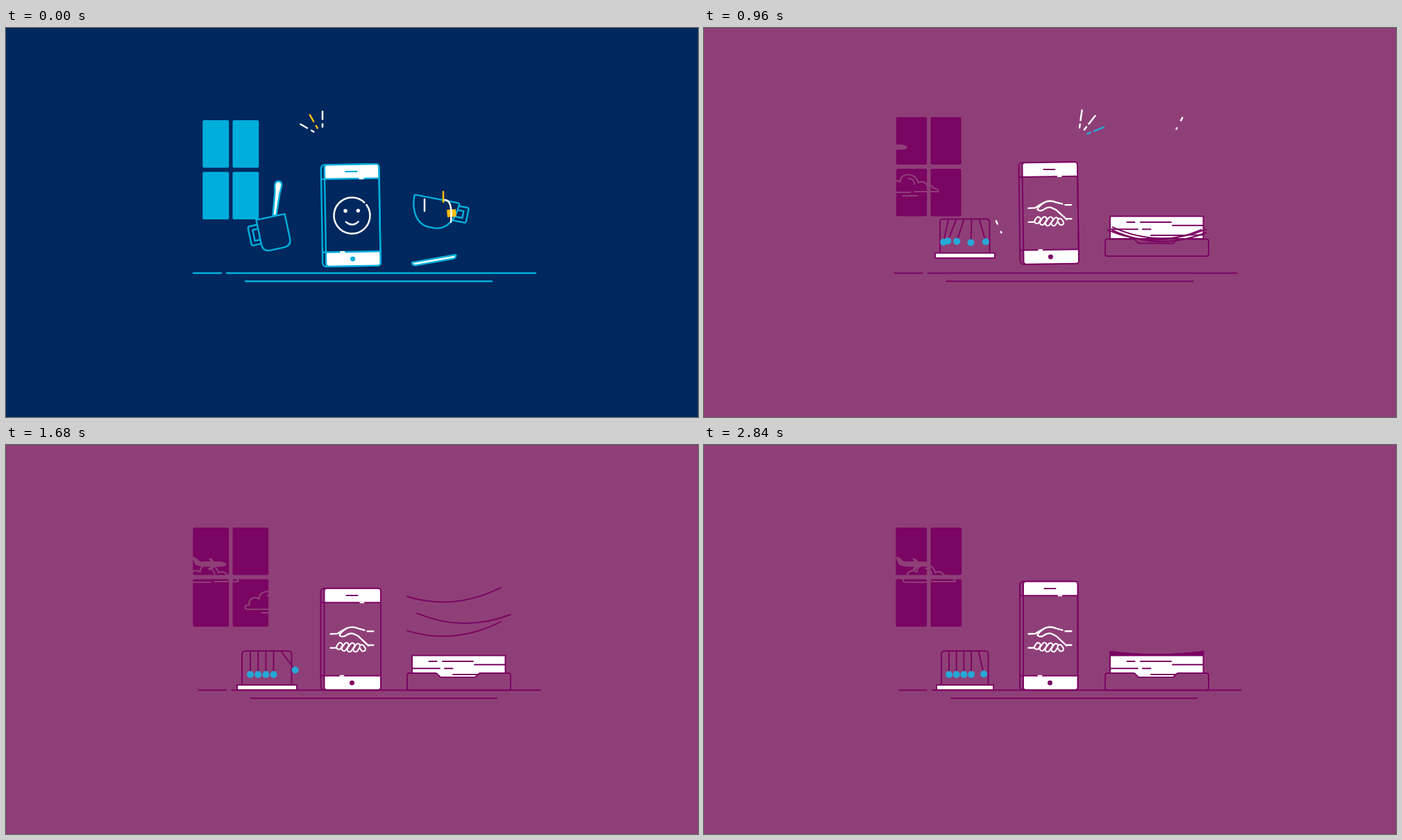
Recreate the animation shown at these times as an HTML page with a canvas. Size 997 by 561 pixels, loop 2880 ms.

```html
<!DOCTYPE html>
<html lang="en">
<head>
<meta charset="utf-8">
<title>Desk scenes</title>
<style>
html, body { margin: 0; width: 100%; height: 100%; overflow: hidden; background: #00285e; }
canvas { display: block; width: 997px; height: 561px; }
</style>
</head>
<body>
<canvas id="stage" width="997" height="561"></canvas>
<script>
const ctx = document.getElementById('stage').getContext('2d');
const LOOP = 2880, STEP = 40, SWITCH = 920, TAU = Math.PI * 2;
const WHITE = '#fff', YELLOW = '#fdbd0b', SKY = '#26a9d6';
const BLUE = { bg: '#00285e', ink: '#00aedb', weight: 2.4 };
const PLUM = { bg: '#8f3f78', ink: '#7b0562', weight: 2 };
let theme = BLUE;

// Motion rules

const clamp = v => Math.max(0, Math.min(1, v));
const ease = v => { const u = clamp(v); return u * u * (3 - 2 * u); };
const mix = (a, b, u) => a.map((v, i) => v + (b[i] - v) * u);
const spring = (age, fade, period) => Math.exp(-age / fade) * Math.cos(TAU * age / period);

// Height above rest of something thrown up from `start` that comes down at `land`.
const hop = (age, start, land, gravity) =>
  age < land ? (land - age) * (start / land + gravity * age) : 0;

// Thrown pose, then pose just before landing, then rest.
const settle = (age, thrown, falling, rest) =>
  mix(mix(thrown, falling, clamp(age / 280)), rest, ease((age - 280) / 160));

// Drawing helpers

function stroke(path, color = theme.ink, width = theme.weight) {
  ctx.strokeStyle = color;
  ctx.lineWidth = width;
  ctx.stroke(typeof path === 'string' ? new Path2D(path) : path);
}

function fill(path, color) {
  ctx.fillStyle = color;
  ctx.fill(typeof path === 'string' ? new Path2D(path) : path);
}

function shape(path, inside, color, width) {
  fill(path, inside);
  stroke(path, color, width);
}

function line(x1, y1, x2, y2, color, width) {
  stroke(`M${x1},${y1}L${x2},${y2}`, color, width);
}

function dot(x, y, r, color) {
  ctx.beginPath();
  ctx.arc(x, y, r, 0, TAU);
  ctx.fillStyle = color;
  ctx.fill();
}

function box(x, y, w, h, r) {
  const p = new Path2D();
  p.roundRect(x, y, w, h, r);
  return p;
}

function at(x, y, degrees, draw) {
  ctx.save();
  ctx.translate(x, y);
  ctx.rotate(degrees * Math.PI / 180);
  draw();
  ctx.restore();
}

// Parts shared by both scenes

function floor(t) {
  const u = t / LOOP, x = 270 + u * (15 - 4.2 * u);
  line(x, 353.5, x + 40, 353.5);
  line(x + 48, 353.5, x + 493, 353.5);
  line(x + 75, 365.3, x + 430, 365.3);
}

function panes(age, squeezed) {
  const inset = squeezed ? 7 : 14 * spring(age, 110, 373);
  const dy = 14 * Math.exp(-age / 105);
  for (const y of [119, 193.5]) {
    fill(box(269.3 + inset, y + dy, 51.9 - inset, 68.5, 2), theme.ink);
    fill(box(326.5, y + dy, 51.7 - inset, 68.5, 2), theme.ink);
  }
}

// Rays 30 degrees apart, each a long outer dash and a short inner one.
function burst(age, x, y, aim, colors, size = 11) {
  const life = clamp(1 - age / 460);
  if (!life) return;
  colors.forEach((color, i) => {
    const a = (aim + 30 * i) * Math.PI / 180, dx = Math.cos(a), dy = Math.sin(a);
    const dash = (r, length) => {
      const r1 = r - length * life / 2, r2 = r + length * life / 2;
      line(x + dx * r1, y + dy * r1, x + dx * r2, y + dy * r2, color, 2.5);
    };
    dash(31 + age / 28, size);
    dash(16.5 + age / 93, size * 0.35);
  });
}

function phone(age, lift, stretch, squeezed, icon) {
  const pinch = squeezed ? 1.5 : 1.5 * clamp(1 - age / 120);
  const left = 453.5 + pinch, right = 540 - pinch, bottom = 353.3 - lift;
  const h = 146.5 + (squeezed ? 10 : stretch), top = bottom - h;
  const band = 20.5 + Math.max(0, stretch) / 6;
  const cx = (left + right) / 2, cy = (top + bottom) / 2, mid = cx + 1.7;
  at(cx, cy, -clamp(1 - age / 280), () => {
    ctx.translate(-cx, -cy);
    const front = box(left + 5, top, right - left - 5, h, 4);
    shape(box(left, top, right - left, h, 5), theme.bg);
    ctx.save();
    ctx.clip(front);
    ctx.fillStyle = WHITE;
    ctx.fillRect(left, top, right - left, band);
    ctx.fillRect(left, bottom - band, right - left, band);
    ctx.restore();
    line(left, top + band, right, top + band);
    line(left, bottom - band, right, bottom - band);
    stroke(front);
    line(mid + 12, top + band, mid + 17, top + band, WHITE);
    line(mid - 17, bottom - band, mid - 12, bottom - band, WHITE);
    line(mid - 8, top + band / 2, mid + 8, top + band / 2);
    dot(mid, bottom - band / 2, 3.5, theme.ink);
    icon(mid, squeezed ? 280 : cy, h / 146.5);
  });
}

// Blue scene

function face(x, y, tall) {
  ctx.save();
  ctx.translate(x, y + 0.5);
  ctx.scale(1, tall);
  ctx.beginPath();
  ctx.arc(0, 0, 26, -0.62, TAU - 0.8);
  ctx.strokeStyle = WHITE;
  ctx.lineWidth = 2.5;
  ctx.stroke();
  dot(-9.3, -7, 2.7, WHITE);
  dot(9, -7, 2.7, WHITE);
  stroke('M-9,9Q0,17 9,9', WHITE, 2.4);
  ctx.restore();
}

function pluses(t) {
  const drift = (t - 280) / 60;
  const marks = [[374, 180], [270, 214], [305, 243], [304, 145], [340, 214]];
  ctx.save();
  ctx.beginPath();
  ctx.rect(266, 112, 112.5, 155);
  ctx.clip();
  marks.forEach(([x, y], i) => {
    const start = i < 3 ? 80 + 40 * i : 140 + 90 * i;
    const r = 3.4 * clamp((t - start) / 120);
    if (r) stroke(`M${x + drift - r},${y}h${2 * r}M${x + drift},${y - r}v${2 * r}`, theme.bg, 2.5);
  });
  ctx.restore();
}

function mug(t) {
  const [sx, sy, lean] = settle(t, [393, 221, 7], [364, 271, -21], [405, 290, 22]);
  at(sx, sy, lean, () => shape('M-5,6Q-5,0 0,0Q5,0 5,6L3.5,18L2.5,50H-2.5L-3.5,18Z', WHITE));
  const [tilt] = settle(t, [-12], [-7], [0]);
  at(386, 330 - hop(t, 34, 340, 0.00018), tilt, () => {
    stroke('M-21,-17H-32Q-35,-17 -35,-14V8Q-35,11 -32,11H-21M-21,-11H-29V5H-21');
    shape('M-21,-24H21V12Q21,23 10,23H-10Q-21,23 -21,12Z', theme.bg);
  });
  if (t >= 160 && t < 400) stroke('M389,294H402Q409,294 413,291.5', YELLOW);
}

function teacup(t) {
  const [plateTilt] = settle(t, [-10], [3.5], [0]);
  at(617, 350.5 - hop(t, 15.5, 320, 0.00027), plateTilt, () =>
    shape('M-32,-2.5H32Q32,2.5 27,2.5H-27Q-32,2.5 -32,-2.5Z', WHITE));

  const [x, tilt] = settle(t, [621, 11], [614.5, -8], [617, 0]);
  at(x, 306 - hop(t, 59.5, 290, 0.0005), tilt, () => {
    stroke('M32,4H45Q47.5,4 47.5,7V23Q47.5,26 45,26H26M32,10H41V20H29');
    shape('M-31,0H31Q33,0 33,3C32,24 22,41 5,42H-5C-22,41 -32,24 -33,3Q-33,0 -31,0Z', theme.bg);
  });

  const [bx, by, turn, tail] = settle(t, [642, 267, -4, 13], [628, 322, -5, -5], [627, 327, 15, -5]);
  const [tx, ty, bulge, rise] = settle(t, [631, 248, 13, -2], [624, 299, -8, 7], [627, 304, 8, 7]);
  at(bx, by, turn, () => fill(box(-6.5, -5.5, 13, 11, 1), YELLOW));
  stroke(`M${tx},${ty}Q${tx + bulge},${ty + rise} ${bx - 1},${by + tail}`, WHITE, 2.5);

  const drop = 1 - t / 160;
  if (drop > 0) {
    line(603, 264 - 17 * drop, 603, 264, WHITE, 2.5);
    line(630, 251 - 15 * drop, 630, 251, YELLOW, 2.5);
  }
  const grow = clamp((t - 480) / 240);
  if (grow) {
    ctx.save();
    ctx.setLineDash([24 * grow, 60]);
    stroke('M611,299Q606,295 607,290', YELLOW);
    stroke('M616,295C612,286 620,284 620,275', YELLOW);
    stroke('M627,299Q623,294 624,286', YELLOW);
    ctx.restore();
  }
}

function blueScene(t) {
  const squeezed = t >= SWITCH - STEP, land = 380;
  panes(t, squeezed);
  pluses(t);
  burst(t, 456, 157, 210, [WHITE, YELLOW, WHITE]);
  floor(t);
  const stretch = t < land ? t / 22 : -10 * spring(t - land, 60, 200);
  phone(t, hop(t, 10, land, 0.000835), stretch, squeezed, face);
  mug(t);
  teacup(t);
}

// Plum scene

function handshake(x, y) {
  at(x, y + 0.5, 0, () => {
    const w = 2.3;
    stroke('M-31,-8L-21,-8.5Q-14,-13 -8,-16Q0,-20 9,-16L18,-13.5M22,-12H31', WHITE, w);
    stroke('M-8,-16Q-17,-10 -18,-6Q-14,-2 -7,-7Q-2,-10 3,-8L9,-5L24,9', WHITE, w);
    stroke('M-31,12H-23L-18,5M24,8H31', WHITE, w);
    for (let i = 0; i < 5; i++) {
      const length = 10 + 4 * Math.sin(i * Math.PI / 4);
      at(-18 + 8.3 * i, 9.5 + 1.1 * i - 0.1 * i * i, i < 4 ? 125 : 55, () =>
        shape(box(-length / 2, -3.3, length, 6.6, 3.3), theme.bg, WHITE, 2.1));
    }
  });
}

function cloud(dx, dy) {
  at(dx, dy, 0, () => {
    stroke('M306,237Q301,237 302,233Q303,230 308,231C306,221 316,218 322,222' +
      'C323,207 345,208 348,223Q358,219 362,229Q367,224 370,231Q377,231 377,236H343M337,237H306', theme.bg, 2.2);
    stroke('M334,217Q342,217 343,225', theme.bg, 2.2);
  });
}

function sky(t) {
  const dx = 74 * (1 - Math.exp((1200 - t) / 560));
  cloud(dx, 0);
  cloud(dx - 85, -39);
  line(326 + dx, 242, 347 + dx, 242, theme.bg);
  at(305 + 0.3 * dx, 171.5, 0, () => {
    fill('M0,0Q-4,-3.5 -10,-3.5H-38L-46,-10H-50L-45,1Q-40,4 -32,4H-8Q-1,4 0,0Z', theme.bg);
    fill('M-26,-8H-22L-14,0L-22,9H-26L-21,0Z', theme.bg);
  });
}

function cradle(t, squeezed) {
  const pinch = squeezed ? 2 : 0, left = 340 + pinch, right = 411.5 - pinch;
  const swing = 43 * Math.cos((t - 1590) * TAU / 1040);
  const shaken = clamp((1480 - t) / 280);
  at(0, -hop(t - SWITCH, 25, 290, 0), 0, () => {
    stroke(`M${left},346V302Q${left},297 ${left + 5},297H${right - 5}Q${right},297 ${right},302V346`);
    [-12, -21, -18, -2, 16].forEach((jolt, i) => {
      const free = i === 4 ? Math.max(0, swing) : i === 0 ? Math.min(0, swing) : 0;
      const a = (free + (jolt - free) * shaken) * Math.PI / 180;
      const x = 352 + i * 11.2 + pinch * (2 - i) / 4;
      const bx = x + 33 * Math.sin(a), by = 298 + 33 * Math.cos(a);
      line(x, 298, bx, by);
      dot(bx, by, 5, SKY);
    });
    shape(box(left - 7, 346, right - left + 14.5, 7.3, 0), WHITE);
  });
}

function tray(age) {
  at(0, -hop(age, 30, 340, 0.00046), 0, () => {
    shape('M585,303.5H719.5V336H585Z', WHITE);
    stroke('M609.5,312H620.5M629,312H673M675,316.7H719M585,322.3H625M632,322.3H643.5M644,331H692M699,330.5H719');
  });
  at(0, -hop(age, 22, 290, 0.00055), 0, () =>
    shape('M581,329H619Q621,329 622,331L626,335H676L681,330Q682,329 684,329H724' +
      'Q727,329 727,332V350Q727,353.5 724,353.5H581Q578,353.5 578,350V332Q578,329 581,329Z', theme.bg));
}

// Three sheets fly up, then sink while swaying; the middle one sways the other way.
function sheets(t) {
  const u = clamp((t - 1200) / 1640), rise = ease((t - SWITCH) / 280);
  const sway = Math.cos((t - 1170) * TAU / 1000);
  for (let i = 0; i < 3; i++) {
    const side = i === 1 ? -1 : 1;
    const x = 652.5 + side * 14 * sway * (1 - u) ** 2;
    const y = 298 - (166 - 41 * i) * rise * (1 - u) ** (i ? 2.4 : 1.9);
    const tilt = (i === 1 ? -1 : 6.5) * sway * Math.min(1, 3 * (1 - u));
    stroke(`M${x - 67.5},${y - tilt}Q${x},${y + 29 - 20 * u * u} ${x + 67.5},${y + tilt}`);
  }
  if (t > 2700) fill('M584,297Q652,306 720.5,297V303.5H584Z', theme.ink);
}

function plumScene(t) {
  const age = t - SWITCH, squeezed = t >= LOOP - STEP, land = 300;
  panes(age, squeezed);
  sky(t);
  burst(age, 539, 158, -82, [WHITE, WHITE, SKY], 16);
  burst(age, 673, 160, -62, [WHITE], 5);
  burst(age, 435, 310, 246, [WHITE], 5);
  floor(t);
  const stretch = age < land ? 0 : -4 * Math.sin((age - land) / 30) * Math.exp((land - age) / 60);
  phone(age, hop(age, 10, land, 0.00042), stretch, squeezed, handshake);
  cradle(t, squeezed);
  tray(age);
  sheets(t);
}

function render(now) {
  const t = Math.floor((now % LOOP) / STEP) * STEP;
  theme = t < SWITCH ? BLUE : PLUM;
  ctx.fillStyle = theme.bg;
  ctx.fillRect(0, 0, 997, 561);
  ctx.lineCap = ctx.lineJoin = 'round';
  (t < SWITCH ? blueScene : plumScene)(t);
}

const begin = performance.now();
function tick() {
  render(performance.now() - begin);
  requestAnimationFrame(tick);
}
tick();
</script>
</body>
</html>
```
